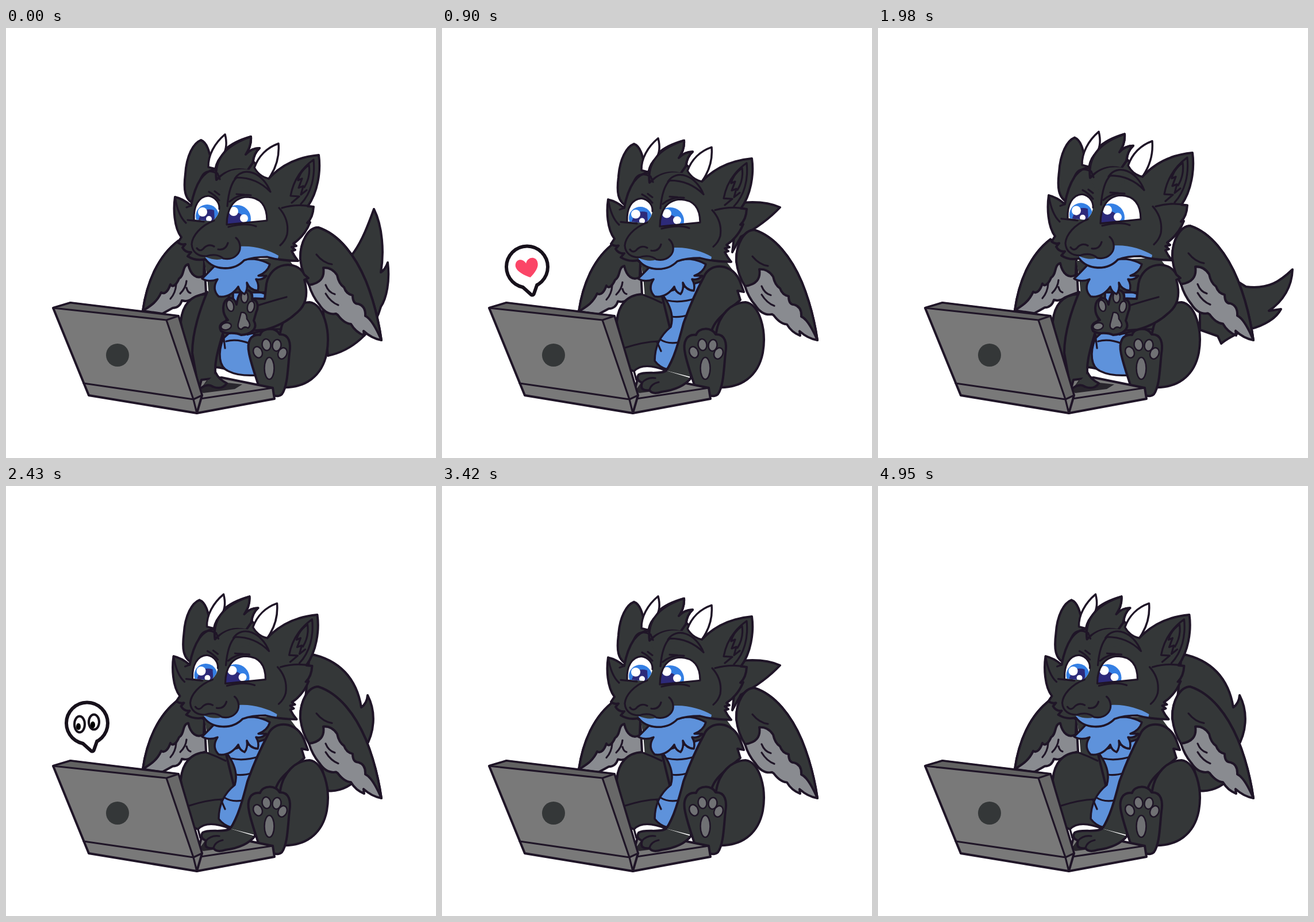
Animation of 748 by 748 pixels, one loop 5.04 s. Source, as an HTML page:

```html
<!DOCTYPE html>
<html lang="en">
<head>
<meta charset="utf-8">
<title>Typing dragon</title>
<style>
  html, body { margin: 0; width: 100%; height: 100%; overflow: hidden; background: #fff; }
  svg { display: block; width: 100vw; height: 100vh; }
  path, ellipse, circle { stroke-linecap: round; stroke-linejoin: round; }
  .fur { fill: #343738; stroke: #1f1527; stroke-width: 4; }
  .line { fill: none; stroke: #1f1527; stroke-width: 3.2; }
  .blue { fill: #5e92db; stroke: #1f1527; stroke-width: 3.5; }
  .feather { fill: #898b90; stroke: #1f1527; stroke-width: 4; }
  .white { fill: #fff; stroke: #1f1527; stroke-width: 3.5; }
  .pad { fill: #707174; stroke: #1f1527; stroke-width: 2.5; }
  .metal { fill: #797979; stroke: #1f1527; stroke-width: 4; }
  .plain { stroke: none; }
  .rim { stroke: #17111b; stroke-width: 12; }
  .inside { fill: #fff; }
  .ink { fill: none; stroke: #17111b; stroke-width: 4; }
</style>
</head>
<body>
<svg viewBox="0 0 748 748">
  <defs>
    <clipPath id="eyeL"><path d="M327 333C326 310 335 293 352 292C365 294 372 305 371 315C370 325 364 332 358 336Z"/></clipPath>
    <clipPath id="eyeR"><path d="M384 342C384 315 395 295 420 294C445 295 454 312 454 335Z"/></clipPath>
  </defs>

  <path id="tail" class="fur"/>

  <g id="wings">
    <path class="feather" d="M238 492C245 442 265 396 300 370L345 405L348 461Q336 465 325 470Q316 477 306 474Q302 487 290 487L272 497Z"/>
    <path class="fur" d="M238 492C245 442 265 396 300 370L345 405L344 431C332 438 321 430 317 411C306 414 311 430 301 436C296 448 289 452 286 446C282 458 276 464 270 460C262 478 250 484 238 492Z"/>
    <path class="line" d="M296 446Q295 461 286 471M314 440Q313 452 303 462M314 452Q316 460 321 461"/>
    <path class="feather" d="M512 403C511 372 526 347 543 347C580 359 608 397 626 440C638 470 648 508 653 543Q636 540 622 527L623 535Q608 529 600 515Q588 514 577 499L574 497Q557 500 545 481Q533 467 527 447Z"/>
    <path class="fur" d="M512 403C511 372 526 347 543 347C580 359 608 397 626 440C638 470 648 508 653 543C644 522 634 505 625 501Q626 484 613 480Q603 480 603 465Q592 463 588 451Q579 445 576 430Q567 416 552 417Q556 443 527 447Q515 428 512 403Z"/>
    <path class="line" d="M556 447Q561 460 572 463M556 462Q565 477 578 482M540 394Q552 409 567 411"/>
  </g>

  <path class="fur plain" d="M345 405C360 470 345 550 385 592L432 604L500 560L520 440L490 400Z"/>
  <path class="fur" d="M348 463C322 464 306 482 304 512L322 592L336 598Q350 584 385 594L396 520L382 463"/>

  <g id="bellyOpen">
    <path class="blue" d="M378 540C368 565 370 590 387 597Q405 606 436 604L424 565L432 532L400 520Z"/>
    <path class="blue" d="M395 460H450L458 474Q440 480 420 500L395 490Z"/>
    <path class="line" d="M378 533L381 557M383 545Q402 540 424 549M440 459L452 463"/>
  </g>
  <g id="bellyStrip">
    <path class="white" d="M334 597Q350 580 390 596L386 612H338Z"/>
    <path class="blue" d="M382 462L454 440L432 512L392 594Q378 590 370 579C370 556 378 536 398 520C404 500 396 480 382 462Z"/>
    <path class="line" d="M392 474Q415 479 442 470M400 502Q412 504 430 499M380 542Q392 550 411 547M374 546L381 562M347 463Q366 470 382 478M319 556Q350 546 376 545"/>
  </g>

  <path id="armLeftStraight" class="fur" d="M350 459C333 500 324 535 324 565L335 628H384Q378 614 365 608C359 575 379 535 385 500L388 462"/>
  <g id="armLeftUp">
    <path class="fur" d="M388 470C360 452 346 462 344 484L326 492C345 488 347 475 334 470C324 468 316 478 308 480C313 457 306 442 291 442C278 443 276 452 278 464C265 452 252 463 258 477C244 470 235 486 245 497L306 515L318 531L397 520Q402 492 388 470Z"/>
    <ellipse class="pad" cx="288" cy="461" rx="8" ry="11" transform="rotate(-20 288 461)"/>
    <ellipse class="pad" cx="266" cy="481" rx="7" ry="10" transform="rotate(-28 266 481)"/>
    <ellipse class="pad" cx="249" cy="487" rx="6" ry="9" transform="rotate(-35 249 487)"/>
    <ellipse class="pad" cx="327" cy="480" rx="11" ry="7" transform="rotate(-28 327 480)"/>
    <path class="pad" d="M276 494Q281 482 296 486Q313 491 313 511L280 506Z"/>
    <path class="line" d="M344 464Q362 465 375 475M308 527L397 522"/>
  </g>

  <path id="armDown" class="fur" d="M390 596C403 578 412 545 420 514C431 483 441 460 456 432C467 407 505 409 518 440L525 459L514 457L519 473C500 490 475 505 469 527L445 570L433 607"/>

  <path class="fur" d="M469 625C470 595 472 555 477 530C482 499 502 478 528 477C552 480 565 525 558 565C550 606 520 627 480 625"/>
  <path class="fur" d="M439 621C434 605 427 586 423 567C418 545 426 532 442 534C446 520 470 520 476 533C493 532 496 549 493 566C490 595 490 622 480 637Q473 643 463 638"/>
  <g id="toes"></g>
  <ellipse class="pad" cx="458" cy="592" rx="8.5" ry="19"/>

  <g id="armRaised">
    <path class="fur" d="M453 445C460 407 506 402 519 429L526 435L519 438C527 467 520 484 505 496C480 520 448 526 420 533L418 478C425 466 438 472 450 471Z"/>
    <path class="fur" d="M374 527C368 516 377 512 386 508C374 495 376 474 388 470C396 468 399 475 401 481C404 462 410 454 420 456C428 458 429 465 428 472C438 472 440 485 435 495L431 509C439 523 426 533 409 534C395 527 386 535 374 527Z"/>
    <ellipse class="pad" cx="390" cy="483" rx="6" ry="10" transform="rotate(-15 390 483)"/>
    <ellipse class="pad" cx="415" cy="468" rx="6" ry="10"/>
    <ellipse class="pad" cx="426" cy="485" rx="6" ry="10" transform="rotate(12 426 485)"/>
    <ellipse class="pad" cx="383" cy="519" rx="9" ry="6" transform="rotate(-12 383 519)"/>
    <path class="pad" d="M409 495Q419 493 419 506Q428 517 421 522Q415 518 410 524Q402 524 404 514Z"/>
    <path class="line" d="M440 482Q462 475 488 468M430 526Q462 523 479 524"/>
  </g>

  <path class="metal" d="M331 646L340 612L375 608L464 626L467 645L332 670Z"/>
  <path d="M337 630L349 613L411 620L398 628L343 635Z" fill="#28252c"/>
  <path class="line" d="M331 646L464 626"/>
  <path id="handLeft" class="fur" d="M337 628Q350 617 360 624Q376 630 384 618Q370 611 365 600"/>
  <path id="handRight" class="fur" d="M390 596C378 604 354 596 342 603Q336 612 348 617Q343 632 361 630Q366 638 382 633Q418 628 433 609"/>
  <path id="fingers" class="line" d="M348 617Q357 607 371 609M361 630Q363 619 377 616"/>

  <path class="metal" d="M82 487L112 478L300 501L341 639L332 670L144 639Z"/>
  <path d="M82 487L112 478L300 501L279 508Z" fill="#626262"/>
  <path d="M279 508L300 501L341 639L326 646Z" fill="#686868"/>
  <path class="line" d="M82 487L279 508L326 646L332 670M279 508L300 501M135 618L326 646L341 639M82 487L112 478L300 501L341 639"/>
  <circle cx="194" cy="569" r="20" fill="#343738"/>

  <path class="blue" d="M341 436C352 426 362 414 375 402H432Q448 404 459 411Q455 425 439 431L453 431Q446 439 435 437Q441 447 438 457Q424 456 419 443Q421 455 415 463Q406 459 404 450Q390 470 370 467Q357 454 368 437Q353 443 341 436Z"/>

  <g id="head">
    <path class="fur" d="M330 307C309 300 309 278 312 254C314 222 326 200 339 195C350 199 354 216 358 235L365 300Z"/>
    <path class="fur" d="M294 294Q308 297 322 309Q327 280 339 262Q352 244 370 247C362 222 386 200 426 189C427 203 422 212 417 220Q427 209 441 209Q431 218 430 232L457 262Q490 226 544 221C548 250 542 286 525 310L535 311Q534 330 524 339L529 338Q520 361 500 375L505 379L497 381L503 386L497 388Q502 398 508 405Q478 405 454 398Q430 398 414 404C395 424 361 421 347 402Q330 406 316 397L322 390Q312 391 307 382L312 376Q305 378 299 373L305 364C292 347 291 314 294 294Z"/>
    <path class="white" d="M352 242C351 222 363 200 381 185C385 201 383 212 378 220Q367 229 364 245Z"/>
    <path class="white" d="M432 243C439 223 454 208 474 201C476 225 469 245 457 262Q441 259 432 243Z"/>
    <path class="fur" d="M366 264C361 226 386 202 426 189C427 203 422 212 417 220Q427 209 441 209Q431 218 429 235L420 248Q390 240 366 264Z"/>
    <path class="fur plain" d="M368 266Q386 241 424 247L426 275L375 285Z"/>
    <path class="line" d="M497 304L510 293L495 292Q502 253 535 229C538 259 531 287 513 306M527 238Q511 250 508 265L515 262L509 278L517 275L513 290L523 282M527 238Q530 259 519 277"/>
    <path class="line" d="M338 264Q345 242 368 253L372 263M398 262C413 239 447 251 460 285Q436 260 401 260Q388 273 385 310M353 285Q363 290 371 300M363 284L371 290M389 302Q405 288 426 291M401 289L415 290"/>
    <g clip-path="url(#eyeL)">
      <path d="M320 285H376V342H320Z" fill="#fff"/>
      <circle cx="350" cy="327" r="20" fill="#347fe4"/>
      <path d="M340 320Q350 313 362 317L363 336H334Z" fill="#2d2a79"/>
      <circle cx="342" cy="320" r="8" fill="#fff"/><circle cx="353" cy="332" r="5" fill="#fff"/>
    </g>
    <g clip-path="url(#eyeR)">
      <path d="M380 290H460V345H380Z" fill="#fff"/>
      <circle cx="402" cy="332" r="24" fill="#347fe4"/>
      <path d="M383 325Q402 314 415 330L414 345H383Z" fill="#2d2a79"/>
      <circle cx="396" cy="319" r="8" fill="#fff"/><circle cx="414" cy="331" r="7" fill="#fff"/>
    </g>
    <path class="line" d="M327 333C326 310 335 293 352 292C365 294 372 305 371 315M384 342C384 315 395 295 420 294C445 295 454 312 454 335L384 342M316 334L344 337M322 309L314 312"/>
    <path class="blue plain" d="M347 398Q365 406 378 401Q402 405 407 380C430 378 458 386 474 396L473 401Q464 401 454 398Q430 398 414 404C395 424 361 421 347 402Z"/>
    <path class="line" d="M362 335C338 344 324 362 323 376C324 391 335 397 348 397Q367 391 378 401C398 405 411 390 406 374Q404 368 400 365M332 383Q338 391 345 382Q353 375 362 380M369 385Q382 387 386 374M475 313Q493 333 489 359Q486 370 477 378M480 313Q508 305 535 311M294 294Q299 326 313 339M347 402C361 421 395 424 414 404Q430 398 454 398Q478 405 508 405M387 346Q418 338 435 345"/>
  </g>

  <g id="bubbles"></g>
</svg>
<script>
const STEP = 90, STEPS = 56, CYCLE = 7, PIVOT = 480;
const $ = id => document.getElementById(id);

// One entry per pose of the typing cycle.
const bob = [[0, 0], [3, -4], [-1, 1], [-5, 6], [-1, 1], [3, -4], [-2.5, 3]];
const tails = [
  "M545 430C600 420 620 370 640 315C655 345 658 390 652 425Q660 420 664 408C668 440 662 470 652 485C640 530 600 562 560 570Z",
  "M560 400L640 450C680 455 700 440 721 420C720 450 705 475 680 492L701 489C690 510 660 522 640 525Q610 538 597 549L591 536L560 525Z",
  "M545 540C600 520 590 420 635 398C675 385 708 376 726 350C724 398 692 432 660 446L682 448C650 480 640 555 560 565Z",
  "M515 304L540 303Q568 303 588 312C573 328 549 347 520 363L505 390Z",
  "M520 330L552 352L520 390Z",
  "M567 343Q579 354 582 375L560 365Z",
  "M528 292C580 302 610 335 618 385Q628 378 629 364C645 395 640 430 625 455L605 515C590 528 570 532 560 530L520 380Z"
];

const tailShapes = { right: "M-11 28L9 46L16 26Z", left: "M-17 26L-16 44L8 28Z" };
const icons = {
  heart: '<path transform="rotate(-6) scale(1.25)" d="M3 15C-10 9-19 1-15-7C-11-14-3-10-1-5C2-14 13-14 15-6C17 2 10 9 3 15Z" fill="#fb4567"/>',
  eyes: '<g class="ink"><ellipse cx="-13" cy="2" rx="9" ry="14"/><ellipse cx="12" cy="-2" rx="9" ry="13"/></g><ellipse cx="-15" cy="6" rx="4" ry="6"/><ellipse cx="10" cy="3" rx="4" ry="6"/>',
  cat: '<circle cx="-4" cy="-11" r="4"/><circle cx="-13" cy="3" r="4"/><path class="ink" d="M9-11Q22-12 19-2Q16 6 8 4Q17 8 11 16Q4 21-1 14"/>',
  cross: '<path d="M-13-12L13 13M12-14L-14 12" stroke="#f5121b" stroke-width="9" fill="none"/>',
  happy: '<path class="ink" d="M-19-8L-12 7L-5-11M-5 9L-2 16L3 8L7 15L10 6M10-12L17 3L25-14"/>'
};
const bubbles = [
  { icon: "heart", side: "right", start: 8, x: 148, y: 429 },
  { icon: "eyes", side: "right", start: 25, x: 141, y: 426 },
  { icon: "cat", side: "left", start: 29, x: 260, y: 433 },
  { icon: "cross", side: "right", start: 43, x: 144, y: 427 },
  { icon: "happy", side: "left", start: 46, x: 253, y: 431 }
];
const bubbleScale = [.6, .95, 1, 1, 1, .95, .85, .5];
const RISE = 6.7;

const balloon = (side, look) => `<g class="${look}"><circle r="33"/><path d="${tailShapes[side]}"/></g>`;

$("toes").innerHTML = [[438, 564], [453, 551], [471, 552], [481, 566]].map(([x, y], i) =>
  `<ellipse class="pad" cx="${x}" cy="${y}" rx="7.5" ry="10" transform="rotate(${i * 16 - 24} ${x} ${y})"/>`).join("");
$("bubbles").innerHTML = bubbles.map(b =>
  `<g>${balloon(b.side, "rim")}${balloon(b.side, "inside")}${icons[b.icon]}</g>`).join("");

const show = (id, on) => $(id).setAttribute("display", on ? "inline" : "none");
const stretch = (id, dx, scale, pivot) =>
  $(id).setAttribute("transform", `translate(${dx} ${pivot * (1 - scale)}) scale(1 ${scale})`);

function draw(step) {
  const pose = step % CYCLE, [dx, dy] = bob[pose];
  const raised = pose < 2, leftUp = pose === 4 || pose === 5;

  $("tail").setAttribute("d", tails[pose]);
  stretch("head", dx, 1 - dy / (PIVOT - 220), PIVOT);
  stretch("wings", 0, 1 - dy * .7 / 195, 543);

  for (const id of ["bellyOpen", "armLeftStraight", "handLeft", "armRaised"]) show(id, raised);
  for (const id of ["bellyStrip", "armDown", "handRight", "fingers"]) show(id, !raised);
  show("armLeftUp", leftUp);
  $("armLeftUp").setAttribute("transform", `translate(0 ${pose === 4 ? 16 : 0})`);

  bubbles.forEach((b, i) => {
    const age = step - b.start, scale = bubbleScale[age] || 0;
    const node = $("bubbles").children[i];
    node.setAttribute("display", scale ? "inline" : "none");
    node.setAttribute("transform", `translate(${b.x} ${b.y - RISE * age}) scale(${scale})`);
  });
}

let last = -1;
function tick() {
  const step = Math.floor(performance.now() / STEP) % STEPS;
  if (step !== last) draw(last = step);
  requestAnimationFrame(tick);
}
tick();
</script>
</body>
</html>
```
